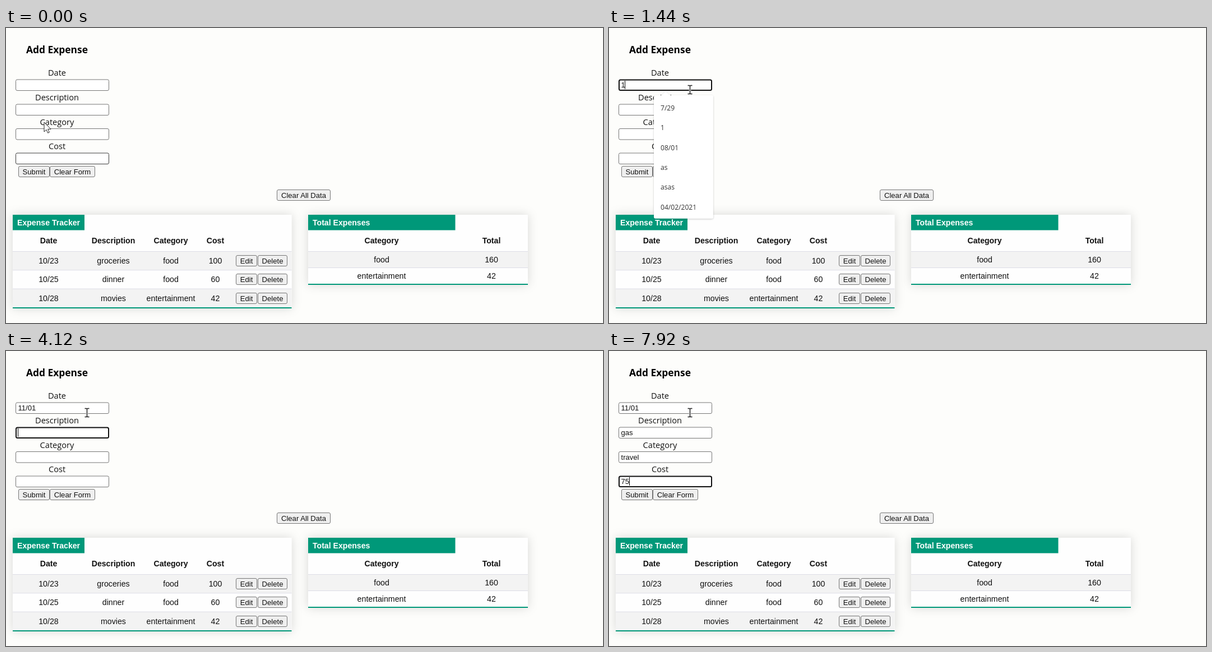
Write an HTML page that moves like this. It is 1065 px wide and 526 px high and loops after 8 s.

```html
<!DOCTYPE html>
<html lang="en">
<head>
<meta charset="utf-8">
<title>Expense form</title>
<style>
  html, body { margin: 0; width: 100%; height: 100%; overflow: hidden; background: #fdfdfb; }
  svg { display: block; width: 1065px; height: 526px; }
  text { font-family: "Liberation Sans", Arial, sans-serif; fill: #111; white-space: pre; }
  .label { font: 14.6px "Open Sans", sans-serif; }
  .title { font: bold 17.4px "Open Sans", sans-serif; fill: #000; }
  .item { font: 12.1px "Open Sans", sans-serif; fill: #333; }
  .cell { font-size: 14.2px; }
  .head { font-size: 14.1px; font-weight: bold; }
  .bar { font-size: 14.1px; font-weight: bold; fill: #fff; }
  .control { font-size: 13.1px; }
  .mid { text-anchor: middle; }
</style>
</head>
<body>
<svg id="stage" viewBox="0 0 1065 526">
  <defs>
    <filter id="cardShadow" x="-10%" y="-25%" width="120%" height="150%">
      <feDropShadow dx="0" dy="0" stdDeviation="9" flood-color="#000" flood-opacity=".15"/>
    </filter>
    <filter id="popupShadow" x="-15%" y="-15%" width="130%" height="130%">
      <feDropShadow dx="0" dy="1" stdDeviation="1.5" flood-color="#000" flood-opacity=".22"/>
    </filter>
  </defs>
</svg>
<script>
const LOOP = 8000, BLINK = 480;
const TEAL = '#009879';
const FIELD_Y = [92, 136, 179.5, 223];

// [time, focused field, its value]
const EDITS = [
  [720, 0, ''], [1440, 0, '1'], [1600, 0, '11'],
  [2320, 0, '11/'], [2400, 0, '11/0'], [2480, 0, '11/01'],
  [3160, 1, ''], [4640, 1, 'g'], [5000, 1, 'ga'], [5160, 1, 'gas'],
  [5400, 2, ''], [6040, 2, 't'], [6160, 2, 'tr'], [6240, 2, 'tra'],
  [6400, 2, 'trav'], [6480, 2, 'trave'], [6640, 2, 'travel'],
  [6960, 3, ''], [7520, 3, '7'], [7720, 3, '75']
];

const POPUPS = [
  { from: 720, to: 1520, y: 120, width: 106, items: ['7/29', '1', '08/01', 'as', 'asas', '04/02/2021'] },
  { from: 4720, to: 5400, y: 165, width: 59, items: ['gas', 'Gas'] }
];

const stage = document.getElementById('stage');
const add = markup => stage.insertAdjacentHTML('beforeend', markup);
const get = id => document.getElementById(id);

const text = (x, y, cls, value) => `<text x="${x}" y="${y}" class="${cls}">${value}</text>`;
const rect = (x, y, w, h, fill, extra = '') =>
  `<rect x="${x}" y="${y}" width="${w}" height="${h}" fill="${fill}" ${extra}/>`;

function button(x, y, w, label) {
  return rect(x + .5, y + .5, w - 1, 19, '#efefef', 'rx="2.5" stroke="#767676"') +
    text(x + w / 2, y + 14.5, 'control mid', label);
}

function card({ x, width, bar, title, columns, heads, rows, rowHeight, bottom, buttons }) {
  let out = rect(x, 333, width, bottom - 333, '#fefefe', 'filter="url(#cardShadow)"') +
    rect(x, 333, bar, 27.5, TEAL) + text(x + 8, 351.5, 'bar', title);
  heads.forEach((head, i) => out += text(columns[i], 384, 'head mid', head));
  rows.forEach((row, r) => {
    const y = 398.5 + r * rowHeight, middle = y + rowHeight / 2;
    out += rect(x, y, width, rowHeight, r % 2 ? '#fefefe' : '#f3f3f3') +
      rect(x, y - .5, width, 1, '#dddde6');
    row.forEach((value, i) => out += text(columns[i], middle + 5, 'cell mid', value));
    if (buttons) {
      const top = Math.round(middle - 10);
      out += button(410, top, 38, 'Edit') + button(449, top, 53, 'Delete');
    }
  });
  return out + rect(x, bottom - 2, width, 2, TEAL);
}

function popup({ y, width, items }, i) {
  const height = items.length * 35.2 + 8.5;
  return `<g id="popup${i}"><g filter="url(#popupShadow)">` +
    rect(80, y, width, height, '#fff', 'rx="3"') +
    `<path d="M93 ${y + 1}L101 ${y - 7}L109 ${y + 1}Z" fill="#fff"/></g>` +
    items.map((item, k) => text(92, y + 27 + k * 35.3, 'item', item)).join('') + '</g>';
}

add(text(91, 45.3, 'title mid', 'Add Expense'));
['Date', 'Description', 'Category', 'Cost'].forEach((label, i) => {
  const y = FIELD_Y[i];
  add(text(91, y - 7, 'label mid', label) +
    `<rect id="box${i}" fill="#fff" rx="2.5"/>` +
    text(21.5, y + 14, 'control', '').replace('<text', `<text id="value${i}"`));
});
add(button(22, 246, 56, 'Submit') + button(78, 246, 81, 'Clear Form') + button(483, 288, 96, 'Clear All Data'));
add(card({
  x: 12, width: 497.5, bar: 128, title: 'Expense Tracker', bottom: 500, rowHeight: 33.3, buttons: true,
  columns: [76, 191.5, 294, 373.5], heads: ['Date', 'Description', 'Category', 'Cost'],
  rows: [['10/23', 'groceries', 'food', '100'], ['10/25', 'dinner', 'food', '60'],
    ['10/28', 'movies', 'entertainment', '42']]
}));
add(card({
  x: 539, width: 392, bar: 262.5, title: 'Total Expenses', bottom: 458, rowHeight: 29,
  columns: [670, 866], heads: ['Category', 'Total'],
  rows: [['food', '160'], ['entertainment', '42']]
}));
add(rect(0, 0, 1, 15, '#000', 'id="caret"'));
POPUPS.forEach((p, i) => add(popup(p, i)));
add(`<path id="arrow" d="M0 0V17L4 13.3L6.6 19.2L9.3 18L6.7 12.3H12Z" fill="#fff" stroke="#222" stroke-width="1"/>
  <g id="beam" fill="none"><path d="M-4 -7.5H4M-4 7.5H4M0 -7V7" stroke="#fff" stroke-width="3.4"/>
  <path d="M-4 -7.5H-1L0 -6.5L1 -7.5H4M-4 7.5H-1L0 6.5L1 7.5H4M0 -6.5V6.5" stroke="#222" stroke-width="1.5"/></g>`);

const show = (id, on) => get(id).setAttribute('visibility', on ? 'visible' : 'hidden');
const set = (id, attrs) => {
  for (const name in attrs) get(id).setAttribute(name, attrs[name]);
};

function drawFields(t) {
  const values = ['', '', '', ''];
  let focus = -1, touched = 0;
  for (const [time, field, value] of EDITS) {
    if (t < time) break;
    values[field] = value;
    focus = field;
    touched = time;
  }
  values.forEach((value, i) => {
    const active = i === focus, inset = active ? 1 : .5;
    get('value' + i).textContent = value;
    set('box' + i, {
      x: 17 + inset, y: FIELD_Y[i] - .5 + inset,
      width: 167 - 2 * inset, height: 20.5 - 2 * inset,
      stroke: active ? '#101010' : i === 3 && t < 120 ? '#3c3c3c' : '#767676',
      'stroke-width': active ? 2 : 1
    });
  });
  const lit = focus >= 0 && Math.floor((t - touched) / BLINK) % 2 === 0;
  show('caret', lit);
  if (lit) {
    const width = values[focus] ? get('value' + focus).getComputedTextLength() : 0;
    set('caret', { x: Math.round(21.5 + width - .4), y: FIELD_Y[focus] + 2 });
  }
}

function drawPointer(t) {
  const step = Math.max(0, Math.min(6, Math.floor((t - 120) / 88) + 1)) / 6;
  const eased = step * step * (3 - 2 * step);
  const x = 68 + 76.5 * eased, y = 168 - 58 * eased;
  const overField = FIELD_Y.some(top => y >= top - .5 && y <= top + 20);
  show('arrow', !overField);
  show('beam', overField);
  set(overField ? 'beam' : 'arrow', { transform: `translate(${x} ${y})` });
}

function draw(t) {
  drawFields(t);
  POPUPS.forEach((p, i) => show('popup' + i, t >= p.from && t < p.to));
  drawPointer(t);
}

const start = performance.now();
function tick(now) {
  draw(Math.max(0, now - start) % LOOP);
  requestAnimationFrame(tick);
}
draw(0);
requestAnimationFrame(tick);
</script>
</body>
</html>
```
